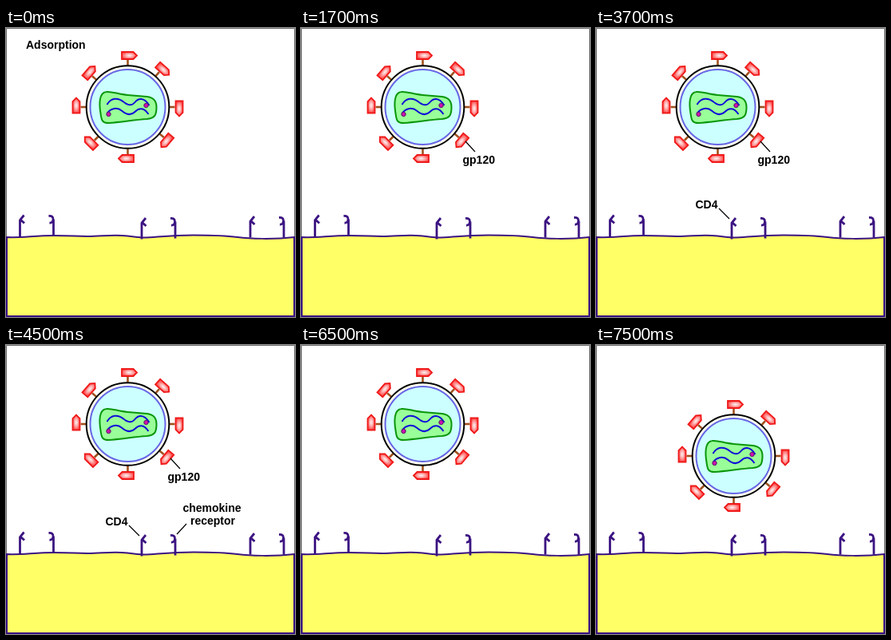
These frames come from a looping animation (362x362 px, 8 s). An HTML page:

```html
<!DOCTYPE html>
<html lang="en">
<head>
<meta charset="utf-8">
<title>Adsorption</title>
<style>
  html, body { margin: 0; width: 100%; height: 100%; overflow: hidden; background: #fff; }
  svg { display: block; width: 100vw; height: 100vh; }
  text { font: bold 14px "Liberation Sans", Arial, sans-serif; }
  .label line { stroke: #000; stroke-width: 1.2; }
  .receptor { fill: none; stroke: #3c1482; stroke-width: 2.8; }
</style>
</head>
<body>
<svg viewBox="0 0 362 362">
  <defs>
    <radialGradient id="glow">
      <stop offset="0" stop-color="#fff0f0"/>
      <stop offset=".35" stop-color="#ffc4c4"/>
      <stop offset="1" stop-color="#ff5050"/>
    </radialGradient>
    <g id="spike">
      <path d="M0-52V-59" stroke="#a0521e" stroke-width="2.6"/>
      <path d="M-7.5-69H7L11.5-64.5L7-60H-7.5Z" fill="url(#glow)" stroke="#f01818" stroke-width="1.8"/>
    </g>
    <path id="cd4" class="receptor" d="M0 25V4M5-1.5L.5 4L5.5 8.5"/>
    <path id="chemokine" class="receptor" d="M0 25V4M-6 0Q0-.5-.5 4.5Q-1 9-5 8.5"/>
  </defs>

  <rect width="362" height="362" fill="#fff"/>
  <path d="M.5 262V.5H361.5V262" fill="none" stroke="#6c6c6c"/>
  <path d="M1 262C20 263 35 260 60 260S85 261 102 261S130 259 145 260S165 262.5 175 262.5S205 259.5 235 259.5S275 260 290 262S335 265 361 262V361H1Z" fill="#ff6" stroke="#3c1482" stroke-width="2"/>

  <use href="#cd4" x="17.5" y="236"/>
  <use href="#cd4" x="170" y="239.5"/>
  <use href="#cd4" x="306" y="237.5"/>
  <use href="#chemokine" x="59.5" y="235.5"/>
  <use href="#chemokine" x="212" y="238.5"/>
  <use href="#chemokine" x="348" y="237.5"/>

  <g id="virus">
    <g id="spikes"></g>
    <circle r="51.8" fill="#fffff0" stroke="#000" stroke-width="2"/>
    <circle r="47" fill="#cff" stroke="#6666e6" stroke-width="2"/>
    <path d="M-27-19C-20-20-12-16 0-15L24-13C33-12 36-7 36 0C36 10 34 14 24 15C8 16-8 19-24 20C-33 20-33 15-34 8C-36-4-36-18-27-19Z" fill="#9f9" stroke="#0a960a" stroke-width="2"/>
    <g fill="none" stroke="#1010d8" stroke-width="2">
      <path d="M-26-3C-21-12-12-12-6-7S5-1 9-6S20-13 27-2"/>
      <path d="M-26 8C-21 1-13 0-7 5S4 11 9 6S20 0 26 9"/>
    </g>
    <g fill="#d010b0" stroke="#502060">
      <circle cx="23" cy="-2" r="2.7"/>
      <circle cx="-24" cy="9" r="2.7"/>
    </g>
  </g>

  <text data-from="0" data-to="500" x="25" y="26">Adsorption</text>
  <g class="label" data-from="500" data-to="6500">
    <line x1="206" y1="142" x2="218" y2="155"/>
    <text x="202.5" y="170">gp120</text>
  </g>
  <g class="label" data-from="2500" data-to="6500">
    <line x1="154" y1="226" x2="167" y2="239"/>
    <text x="124.5" y="225.5">CD4</text>
  </g>
  <g class="label" data-from="4500" data-to="6500" text-anchor="middle">
    <line x1="226" y1="224" x2="214" y2="237"/>
    <text x="258" y="208.5">chemokine</text>
    <text x="259" y="225">receptor</text>
  </g>
</svg>
<script>
  const LOOP = 8000;
  const SPIKE_ANGLES = [0, 42, 90, 130, 180, 225, 270, 311];
  const virus = document.getElementById('virus');
  const timed = document.querySelectorAll('[data-from]');

  document.getElementById('spikes').innerHTML = SPIKE_ANGLES.map(angle =>
    `<use href="#spike" transform="rotate(${angle})"/>`).join('');

  function render(t) {
    for (const el of timed) {
      const on = t >= +el.dataset.from && t < +el.dataset.to;
      el.setAttribute('visibility', on ? 'visible' : 'hidden');
    }
    // The virus descends in discrete half-second steps.
    const step = Math.max(0, Math.floor((t - 6500) / 500));
    virus.setAttribute('transform', `translate(${152.5 + 10 * step} ${99 + 20 * step})`);
  }

  function tick() {
    render(performance.now() % LOOP);
    requestAnimationFrame(tick);
  }
  tick();
</script>
</body>
</html>
```
